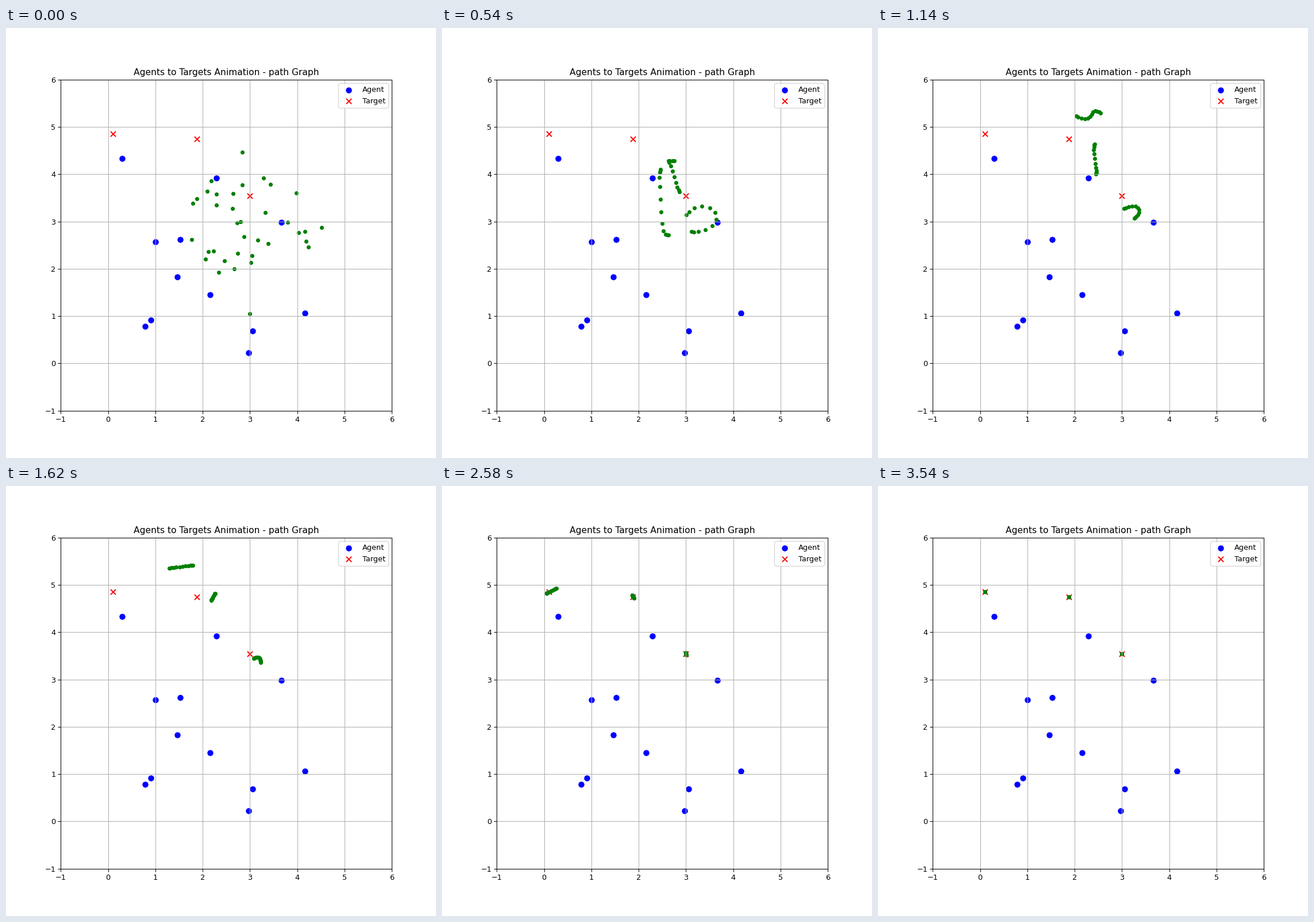
Write a matplotlib script that moves like this. It is 748 px wide and 748 px high and loops after 9.15 s.

```python
import numpy as np
import matplotlib.pyplot as plt
from matplotlib.animation import FuncAnimation

SIZE, DPI = 748, 93
STEP_MS, TICK_MS, LOOP_MS = 60, 30, 9150
SETTLED, LAST_STEP = 50, 59
DOTS = 12

AGENTS = np.array([
    (0.296, 4.33), (2.284, 3.922), (3.657, 2.989), (1.00, 2.57), (1.521, 2.624), (1.464, 1.83),
    (2.157, 1.453), (4.156, 1.058), (0.907, 0.918), (0.785, 0.78), (3.056, 0.69), (2.964, 0.225)])
TARGETS = np.array([(0.105, 4.85), (1.88, 4.748), (3.00, 3.545)])

# Shape of each chain of estimates: step -> a few points along it, in stage pixels.
LEFT = {
    5: [(416, 338), (401, 307), (390, 274), (410, 262)],
    13: [(400, 233), (400, 211), (395, 198), (397, 201)],
    19: [(345, 153), (366, 157), (374, 147), (387, 148)],
    27: [(284, 143), (325, 138)],
    32: [(255, 150), (288, 139)],
    43: [(182, 187), (199, 178)],
}
MIDDLE = {
    5: [(399, 381), (379, 362), (378, 288), (381, 261)],
    13: [(389, 331), (384, 307), (379, 267), (379, 230)],
    19: [(379, 254), (379, 242), (376, 221), (377, 202)],
    27: [(357, 199), (360, 194), (364, 187)],
    43: [(334, 195), (331, 190)],
}
RIGHT = {
    5: [(423, 324), (482, 312), (479, 350), (425, 357)],
    13: [(423, 324), (456, 315), (464, 334), (437, 348)],
    19: [(428, 314), (449, 311), (454, 320), (446, 331)],
    27: [(431, 300), (440, 299), (443, 307)],
    43: [(424, 290), (425, 294)],
}

# Dots gather at the free ends of a path graph, like samples of a cosine.
ALONG = np.cos(np.pi * (np.arange(DOTS) + 0.5) / DOTS)

# One round of averaging between neighbours on the path.
LINKS = np.eye(DOTS, k=1) + np.eye(DOTS, k=-1)
MIX = np.eye(DOTS) - 0.3 * (np.diag(LINKS.sum(axis=0)) - LINKS)

rng = np.random.default_rng(4)


def to_data(px):
    """Stage pixels to axis units."""
    x, y = np.array(px, float).T
    return np.stack([(x - 95.7) / 82.24 - 1, 6 - (y - 90.06) / 82.24], axis=-1)


def bend(points):
    """Place the dots on the polynomial curve through the points."""
    n = len(points)
    coef = np.polyfit(np.linspace(1, -1, n), to_data(points), n - 1)
    return np.vander(ALONG, n) @ coef


def scatter_noise():
    """Random offsets without the slow bends that the key shapes describe."""
    noise = rng.normal(0, 0.65, (DOTS, 2))
    slow = np.vander(ALONG, 4)
    return noise - slow @ np.linalg.lstsq(slow, noise, rcond=None)[0]


class Chain:
    """Dots that start scattered, line up and drift smoothly to a target."""

    def __init__(self, keys, target):
        steps = list(keys)
        shapes = [bend(points) for points in keys.values()]
        start = shapes[0] + (shapes[0] - shapes[1]) * steps[0] / (steps[1] - steps[0])
        end = np.tile(target, (DOTS, 1))
        self.t = np.array([0, *steps, SETTLED, LAST_STEP], float)
        self.p = np.array([start, *shapes, end, end])
        self.m = np.gradient(self.p, self.t, axis=0)
        self.m[-2:] = 0
        self.noise = scatter_noise()

    def at(self, step):
        i = min(np.searchsorted(self.t, step, side="right") - 1, len(self.t) - 2)
        h = self.t[i + 1] - self.t[i]
        u = (step - self.t[i]) / h
        ease = u * u * (3 - 2 * u)
        place = self.p[i] + ease * (self.p[i + 1] - self.p[i])
        place += h * u * (1 - u) * ((1 - u) * self.m[i] - u * self.m[i + 1])
        return place + np.linalg.matrix_power(MIX, step) @ self.noise


chains = [Chain(keys, target) for keys, target in zip((LEFT, MIDDLE, RIGHT), TARGETS)]


def estimates(step):
    return np.concatenate([c.at(step) for c in chains])


side = SIZE / DPI + 1e-9  # keeps the pixel count from rounding down
fig, ax = plt.subplots(figsize=(side, side), dpi=DPI)
ax.set_xlim(-1, 6)
ax.set_ylim(-1, 6)
ax.set_aspect("equal")
ax.grid(True)
ax.set_title("Agents to Targets Animation - path Graph")
ax.scatter(*AGENTS.T, s=50, c="blue", label="Agent")
ax.scatter(*TARGETS.T, s=50, c="red", marker="x", label="Target")
dots = ax.scatter(*estimates(0).T, s=20, c="green")
ax.legend(loc="upper right")


def update(tick):
    step = min(tick * TICK_MS // STEP_MS, LAST_STEP)
    dots.set_offsets(estimates(step))
    return dots,


anim = FuncAnimation(fig, update, frames=LOOP_MS // TICK_MS, interval=TICK_MS,
                     repeat=True, repeat_delay=0, blit=False)
plt.show()
```
